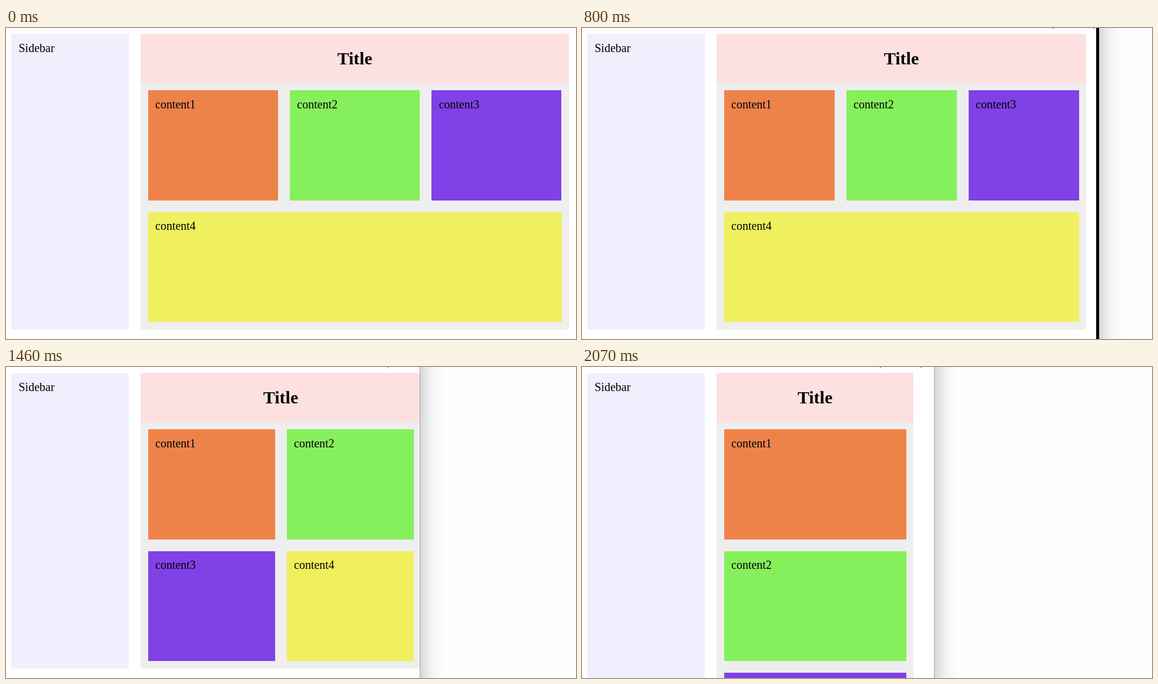
Recreate the animation shown at these times as an HTML page. Size 970 by 530 pixels, loop 2.47 s.

```html
<!DOCTYPE html>
<html lang="en">
<head>
<meta charset="utf-8">
<title>Responsive grid</title>
<style>
  html, body { margin: 0; width: 100%; height: 100%; overflow: hidden; background: #fff; }
  svg { display: block; width: 970px; height: 530px; }
  rect { shape-rendering: crispEdges; }
  text { font: 20px "Liberation Serif", "Times New Roman", serif; fill: #000; }
  #title { font-size: 30px; font-weight: bold; text-anchor: middle; }
</style>
</head>
<body>
<svg id="stage" viewBox="0 0 970 530">
  <defs>
    <linearGradient id="fade">
      <stop offset="0" stop-color="#d6d6d6"/>
      <stop offset=".2" stop-color="#e5e5e5"/>
      <stop offset=".5" stop-color="#f4f4f4"/>
      <stop offset=".8" stop-color="#fbfbfb"/>
      <stop offset="1" stop-color="#fefefe"/>
    </linearGradient>
  </defs>
</svg>
<script>
const LOOP = 2470, LEFT = 229, PAD = 12.5, GAP = 20, MIN_COL = 187.5;
const COLORS = ['#ee834a', '#86f05c', '#8041e7', '#f0f05e'];

const TICKS = [470, 540, 600, 670, 730, 800, 870, 940, 990, 1070, 1130, 1200, 1270,
  1330, 1400, 1460, 1530, 1600, 1670, 1730, 1800, 1870, 1930, 2000, 2070];

// [time, right edge of page content, window edge, border width]
const KEYS = [
  [400, 958, 970, 2], [670, 883, 910, 2], [940, 831, 837, 9], [990, 793, 806, 4],
  [1200, 743, 769, 4], [1460, 706, 704, 0], [1530, 659, 664, 4],
  [1800, 608, 622, 4], [2070, 564, 599, 0]
];

const stage = document.getElementById('stage');

function add(tag, attrs, label) {
  const el = document.createElementNS('http://www.w3.org/2000/svg', tag);
  for (const k in attrs) el.setAttribute(k, attrs[k]);
  if (label) el.textContent = label;
  stage.append(el);
  return el;
}
const box = (x, y, width, height, fill) => add('rect', { x, y, width, height, fill });

function span(el, left, right) {
  const x = Math.round(left);
  el.setAttribute('x', x);
  el.setAttribute('width', Math.max(0, Math.round(right) - x));
}

const sidebar = box(9, 10, 200, 504, '#f0effe');
add('text', { x: 9 + PAD, y: 41 }, 'Sidebar');
const main = box(LEFT, 10, 729, 504, '#eeeeee');
const header = box(LEFT, 10, 729, 84, '#fde0e0');
const title = add('text', { id: 'title', y: 62 }, 'Title');
const cards = COLORS.map((color, i) => ({
  rect: box(0, 0, 0, 0, color),
  label: add('text', {}, 'content' + (i + 1))
}));
const marks = [-57, 12].map(offset => ({ offset, rect: box(0, 0, 2, 2, '#aaa') }));
const outside = box(970, 0, 970, 530, '#fefefe');
const shadow = box(970, 0, 42, 530, 'url(#fade)');
const border = box(970, 0, 1, 530, '#000');

function stateAt(time) {
  const t = TICKS.filter(tick => tick <= time).pop();
  if (!t) return KEYS[0].slice(1);
  const n = KEYS.findIndex(key => key[0] >= t);
  const a = KEYS[n - 1], b = KEYS[n];
  const k = (t - a[0]) / (b[0] - a[0]);
  return [1, 2, 3].map(j => Math.round(a[j] + (b[j] - a[j]) * k));
}

function layoutCards(right) {
  const start = LEFT + PAD, room = right - PAD - start;
  const cols = Math.min(3, Math.floor((room + GAP) / (MIN_COL + GAP)));
  cards.forEach(({ rect, label }, i) => {
    const row = Math.floor(i / cols);
    const inRow = Math.min(cols, cards.length - row * cols);
    const w = Math.floor((room - GAP * (inRow - 1)) / inRow * 64) / 64;
    const x = start + (i % cols) * (w + GAP);
    const y = 106.25 + row * (MIN_COL + GAP);
    const top = Math.round(y);
    span(rect, x, x + w);
    rect.setAttribute('y', top);
    rect.setAttribute('height', Math.round(y + MIN_COL) - top);
    label.setAttribute('x', x + PAD);
    label.setAttribute('y', Math.round(y + 30.5));
  });
  return cols;
}

function draw(time) {
  const [right, edge, thick] = stateAt(time);
  const cols = layoutCards(right);
  const height = cols === 1 ? 520 : 504;
  sidebar.setAttribute('height', height);
  main.setAttribute('height', height);
  span(main, LEFT, right);
  span(header, LEFT, right);
  title.setAttribute('x', (LEFT + right) / 2);

  const moving = time >= TICKS[0];
  for (const { offset, rect } of marks) {
    span(rect, right + offset, right + offset + (moving ? 2 : 0));
  }
  const end = edge + Math.max(1, thick);
  outside.setAttribute('x', edge);
  shadow.setAttribute('x', end);
  span(border, edge, end);
  border.setAttribute('fill', thick ? '#000' : '#a8a8a8');
}

const origin = performance.now();
function tick() {
  draw((performance.now() - origin) % LOOP);
  requestAnimationFrame(tick);
}
tick();
</script>
</body>
</html>
```
